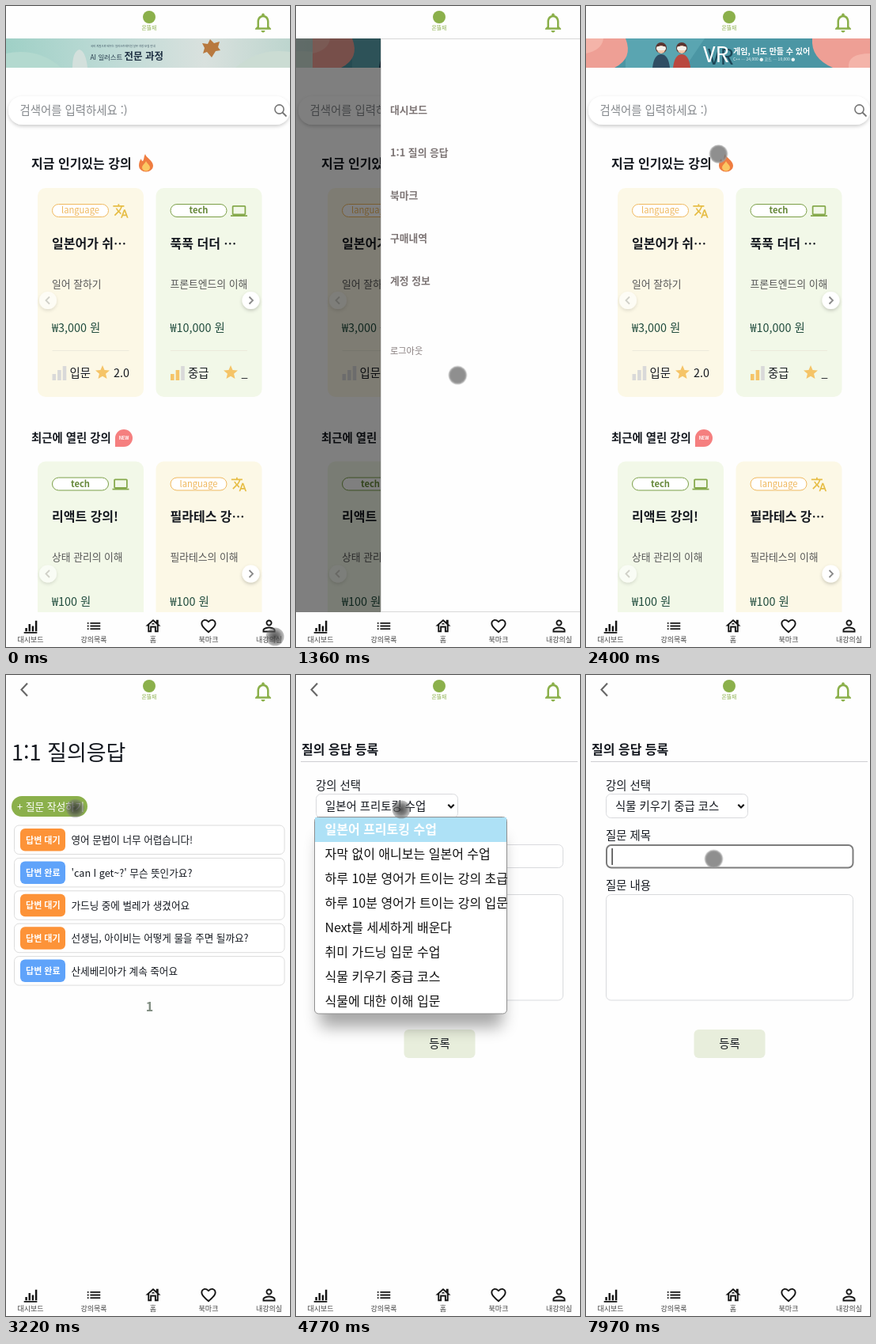
These frames come from a looping animation (359 px wide and 810 px high, 8000 ms). An HTML page:

```html
<!DOCTYPE html>
<html lang="ko">
<head>
<meta charset="utf-8">
<title>강의 앱</title>
<style>
  html, body { margin: 0; width: 100%; height: 100%; overflow: hidden; background: #fefefe; }
  svg { display: block; }
  text { font-family: "Noto Sans CJK KR", "Noto Sans", sans-serif; }
</style>
</head>
<body>
<svg id="stage" width="359" height="810" viewBox="0 0 359 810">
  <defs>
    <linearGradient id="sky">
      <stop offset="0" stop-color="#9fd0c6"/><stop offset=".35" stop-color="#bcdad5"/>
      <stop offset=".7" stop-color="#d9e1de"/><stop offset="1" stop-color="#bdd5ce"/>
    </linearGradient>
    <radialGradient id="press">
      <stop offset="0" stop-color="#333" stop-opacity=".85"/>
      <stop offset=".55" stop-color="#505050" stop-opacity=".72"/>
      <stop offset="1" stop-color="#777" stop-opacity=".45"/>
    </radialGradient>
    <filter id="soft" x="-20%" y="-50%" width="140%" height="220%">
      <feDropShadow dx="0" dy="2" stdDeviation="2" flood-opacity=".2"/>
    </filter>
    <filter id="blur" x="-20%" y="-20%" width="140%" height="140%"><feGaussianBlur stdDeviation="10"/></filter>
    <clipPath id="strip"><rect y="41" width="359" height="37"/></clipPath>
  </defs>
</svg>
<script>
const LOOP = 8000;
const GREEN = '#8bb04b', INK = '#14181f';
const stage = document.getElementById('stage');

const icons = {
  translate: 'M12.87 15.07l-2.54-2.51.03-.03c1.74-1.94 2.98-4.17 3.71-6.53H17V4h-7V2H8v2H1v1.99h11.17C11.5 7.92 10.44 9.75 9 11.35 8.07 10.32 7.3 9.19 6.69 8h-2c.73 1.63 1.73 3.17 2.98 4.56l-5.09 5.02L4 19l5-5 3.11 3.11.76-2.04zM18.5 10h-2L12 22h2l1.12-3h4.75L21 22h2l-4.5-12zm-2.62 7l1.62-4.33L19.12 17h-3.24z',
  laptop: 'M20 18c1.1 0 2-.9 2-2V6c0-1.1-.9-2-2-2H4c-1.1 0-2 .9-2 2v10c0 1.1.9 2 2 2H0v2h24v-2h-4zM4 6h16v10H4V6z',
  star: 'M12 17.27L18.18 21l-1.64-7.03L22 9.24l-7.19-.61L12 2 9.19 8.63 2 9.24l5.46 4.73L5.82 21z',
  bell: 'M12 22c1.1 0 2-.9 2-2h-4c0 1.1.9 2 2 2zm6-6v-5c0-3.07-1.63-5.64-4.5-6.32V4c0-.83-.67-1.5-1.5-1.5s-1.5.67-1.5 1.5v.68C7.64 5.36 6 7.92 6 11v5l-2 2v1h16v-1l-2-2zm-2 1H8v-6c0-2.48 1.51-4.5 4-4.5s4 2.02 4 4.5v6z',
  chart: 'M2 21h20v2H2zM4 15h3v5H4zM9 9h3v11H9zM14 12h3v8h-3zM19 4h3v16h-3z',
  list: 'M3 13h2v-2H3v2zm0 4h2v-2H3v2zm0-8h2V7H3v2zm4 4h14v-2H7v2zm0 4h14v-2H7v2zM7 7v2h14V7H7z',
  house: 'M19 9.3V4h-3v2.6L12 3 2 12h3v8h5v-6h4v6h5v-8h3l-3-2.7zM17 18h-1v-6H8v6H7v-7.81l5-4.5 5 4.5V18zM10 10c0-1.1.9-2 2-2s2 .9 2 2h-4z',
  heart: 'M16.5 3c-1.74 0-3.41.81-4.5 2.09C10.91 3.81 9.24 3 7.5 3 4.42 3 2 5.42 2 8.5c0 3.78 3.4 6.86 8.55 11.54L12 21.35l1.45-1.32C18.6 15.36 22 12.28 22 8.5 22 5.42 19.58 3 16.5 3zm-4.4 15.55l-.1.1-.1-.1C7.14 14.24 4 11.39 4 8.5 4 6.5 5.5 5 7.5 5c1.54 0 3.04.99 3.57 2.36h1.87C13.46 5.99 14.96 5 16.5 5c2 0 3.5 1.5 3.5 3.5 0 2.89-3.14 5.74-7.9 10.05z',
  person: 'M12 5.9c1.16 0 2.1.94 2.1 2.1s-.94 2.1-2.1 2.1S9.9 9.16 9.9 8s.94-2.1 2.1-2.1m0 9c2.97 0 6.1 1.46 6.1 2.1v1.1H5.9V17c0-.64 3.13-2.1 6.1-2.1M12 4C9.79 4 8 5.79 8 8s1.79 4 4 4 4-1.79 4-4-1.79-4-4-4zm0 9c-2.67 0-8 1.34-8 4v3h16v-3c0-2.66-5.33-4-8-4z'
};

// Drawing helpers; text and icons are placed by their vertical centre.
const text = (x, y, size, str, fill = INK, weight = 400, anchor = 'start') =>
  `<text x="${x}" y="${y + size * .37}" font-size="${size}" fill="${fill}" font-weight="${weight}" text-anchor="${anchor}">${str}</text>`;
const rect = (x, y, w, h, r, fill, more = '') =>
  `<rect x="${x}" y="${y}" width="${w}" height="${h}" rx="${r}" fill="${fill}" ${more}/>`;
const path = (d, fill, more = '') => `<path d="${d}" fill="${fill}" ${more}/>`;
const line = (d, color, width) => path(d, 'none', `stroke="${color}" stroke-width="${width}"`);
const circle = (x, y, r, fill, more = '') => `<circle cx="${x}" cy="${y}" r="${r}" fill="${fill}" ${more}/>`;
const icon = (name, x, y, size, fill) =>
  path(icons[name], fill, `transform="translate(${x - size / 2} ${y - size / 2}) scale(${size / 24})"`);
const group = (id, body, more = '') => `<g id="${id}" ${more}>${body}</g>`;

const kinds = {
  language: { bg: '#fcf8e6', edge: '#f0b95f', ink: '#efb75c', icon: 'translate', tint: '#e6bd45', weight: 500 },
  tech: { bg: '#f2f8e8', edge: '#7b9f47', ink: '#66883a', icon: 'laptop', tint: '#86a94c', weight: 700 }
};

function card(x, y, kind, title, sub, price, level, bars, score) {
  const k = kinds[kind], l = x + 18.5;
  return rect(x, y, 134, 264, 10, k.bg) +
    rect(l, y + 20.5, 71, 16, 8, '#fff', `stroke="${k.edge}"`) +
    text(l + 35.5, y + 28, 11.2, kind, k.ink, k.weight, 'middle') +
    icon(k.icon, x + 105, y + 29, 21, k.tint) +
    text(l - .5, y + 70, 16, title, INK, 600) +
    text(l - .5, y + 121, 12.8, sub, '#555') +
    text(l - .5, y + 177, 14.4, `₩${price} 원`, '#1f4b3c', 500) +
    line(`M${l} ${y + 205.5}h97`, '#eceadb', 1) +
    [8, 13, 18].map((h, i) => rect(l + i * 6.6, y + 243 - h, 4.6, h, 0, i < bars ? '#f5c468' : '#d9d9d9')).join('') +
    text(x + 40.5, y + 234, 14.4, level) +
    icon('star', x + (score === '_' ? 94.5 : 82), y + 233, 21.5, '#f5c468') +
    text(x + 116, y + 234, 14.4, score, INK, 400, 'end').replace('text-anchor="end"', score === '_' ? 'text-anchor="end"' : 'text-anchor="end"');
}

function arrows(y) {
  return circle(53, y, 11, '#fff', 'opacity=".6" filter="url(#soft)"') + line(`M55 ${y - 4.5}l-4.5 4.5 4.5 4.5`, '#d0d0c8', 1.8) +
    circle(309.5, y, 11, '#fff', 'filter="url(#soft)"') + line(`M307.5 ${y - 4.5}l4.5 4.5-4.5 4.5`, '#8a8a8a', 1.8);
}

const artBanner = rect(0, 41, 359, 37, 0, 'url(#sky)') +
  path('M0 78V60Q40 52 70 78z', '#b3d9cf') + path('M84 78Q84 57 93 55Q101 58 103 78z', '#d3e0dc') +
  path('M260 65L254 58 249 60 251 53 248 47 255 48 258 42 263 47 270 45 268 52 271 56 265 57z', '#b8793f') +
  path('M290 78Q320 52 359 58V78z', '#cbdcd3') +
  text(107, 51, 3.4, '국비 지원으로 배우는 일러스트레이션 실무 과정 모집 안내', '#3b5160') +
  text(106.5, 64.5, 8.4, 'AI 일러스트', '#24384a', 500) + text(149.5, 63.5, 12.5, '전문 과정', '#1d2f42', 700);

const player = (x, coat) => circle(x, 53, 7, '#5a3430') + circle(x, 55, 5, '#f1c9ae') +
  rect(x - 6, 51, 12, 5, 2, '#f4f1ea') + path(`M${x - 11} 78Q${x - 9} 61 ${x} 61T${x + 11} 78z`, coat);
const gameBanner = group('game', rect(0, 41, 359, 37, 0, '#4b96a4') +
  path('M50 78V41H150L125 78z', '#5aa5b1') +
  path('M0 41H50Q60 66 36 78H0z', '#ee9f95') + path('M359 41H286Q284 66 312 78H359z', '#ee9f95') +
  path('M0 41H22Q20 56 0 60z', '#f4b4a9') + path('M359 60Q330 60 332 78H359z', '#f4b4a9') +
  player(95, '#2f4d63') + player(121, '#b9483f') +
  text(154, 64, 27, 'VR', '#1c4656', 500) + text(148, 61, 27, 'VR', '#fff', 400) +
  text(186, 57, 10, '게임, 너도 만들 수 있어', '#fff', 700) +
  text(186, 67.5, 5, 'C++ ─ 24,000 ● 코드 ─ 10,000 ●', '#e8f3f3'), 'transform="translate(359 0)"');

const home = group('home',
  group('strip-box', group('banners', artBanner + gameBanner), 'clip-path="url(#strip)"') +
  rect(3, 114, 356, 36, 18, '#fff', 'filter="url(#soft)"') +
  text(17.5, 131.5, 14.4, '검색어를 입력하세요 :)', '#84888c', 500) +
  circle(345.5, 130.5, 5.6, 'none', 'stroke="#777" stroke-width="1.6"') + line('M349.5 134.5l5 5', '#777', 1.8) +
  text(32, 199, 16, '지금 인기있는 강의', INK, 600) +
  path('M176 187c1 5 10 8 10 15a9 7.5 0 0 1-18 0c0-4 1-7 3-9 0 2 1 3 2 3 2-3 1-6 3-9z', '#ef7d40') +
  path('M177 196c1 3 5 5 5 8a5 4.5 0 0 1-10 0c0-3 4-5 5-8z', '#fbc763') +
  card(40, 230, 'language', '일본어가 쉬…', '일어 잘하기', '3,000', '입문', 0, '2.0') +
  card(189.5, 230, 'tech', '푹푹 더더 …', '프론트엔드의 이해', '10,000', '중급', 2, '_') +
  arrows(372) +
  text(32, 546, 14.4, '최근에 열린 강의', INK, 600) +
  path('M138 557V546a11 11 0 1 1 11 11z', '#f57f7f') + text(149, 546, 5.6, 'NEW', '#fff', 700, 'middle') +
  card(40, 575.5, 'tech', '리액트 강의!', '상태 관리의 이해', '100', '중급', 2, '_') +
  card(189.5, 575.5, 'language', '필라테스 강…', '필라테스의 이해', '100', '입문', 0, '_') +
  arrows(717.5));

const menu = ['대시보드', '1:1 질의 응답', '북마크', '구매내역', '계정 정보'];
const drawer = group('shade', rect(0, 41, 359, 725, 0, '#000', 'opacity=".5"')) +
  group('drawer', rect(107.5, 41.5, 260, 724, 0, '#fefefe', 'stroke="#d8d8d8"') +
    menu.map((m, i) => text(119, 131.5 + 54 * i, 12.8, m, '#7d7575', 700)).join('') +
    text(119, 436, 11.2, '로그아웃', '#857b7b', 500));

const questions = [
  [0, '영어 문법이 너무 어렵습니다!'], [1, "'can I get~?' 무슨 뜻인가요?"], [0, '가드닝 중에 벌레가 생겼어요'],
  [0, '선생님, 아이비는 어떻게 물을 주면 될까요?'], [1, '산세베리아가 계속 죽어요']
];
const board = group('board',
  text(7, 98, 27, '1:1 질의응답', INK, 500) +
  rect(7, 153, 96, 26, 13, GREEN) + text(14, 166.5, 12.8, '+ 질문 작성하기', '#fff', 500) +
  group('rows', questions.map(([done, q], i) => {
    const y = 190 + 41.4 * i;
    return rect(10.5, y, 341.5, 36.5, 6, '#fff', 'stroke="#dcdcdc"') +
      rect(18, y + 4, 57, 28.5, 6, done ? '#5fa3fa' : '#fd9338') +
      text(46.8, y + 18.5, 11, done ? '답변 완료' : '답변 대기', '#fff', 700, 'middle') +
      text(82.5, y + 18.5, 12.6, q, INK, 500);
  }).join('') + text(181.5, 419, 16, '1', '#7f8c80', 700, 'middle')));

const courses = ['일본어 프리토킹 수업', '자막 없이 애니보는 일본어 수업', '하루 10분 영어가 트이는 강의 초급',
  '하루 10분 영어가 트이는 강의 입문', 'Next를 세세하게 배운다', '취미 가드닝 입문 수업', '식물 키우기 중급 코스', '식물에 대한 이해 입문'];
const field = (y, w, h) => rect(25.5, y, w, h, 6, '#fff', 'stroke="#d9dadd"');
const form = group('form',
  text(7, 94, 16, '질의 응답 등록', INK, 600) + line('M6 109.5H356', '#cfcfd2', 1) +
  text(25, 139.5, 14.4, '강의 선택', INK, 500) + field(150.5, 179, 30) +
  text(37, 166, 14.4, courses[0]).replace('<text', '<text id="before"') +
  text(37, 166, 14.4, courses[6]).replace('<text', '<text id="after"') +
  line('M192.3 163.8l3.7 3.7 3.7-3.7', '#111', 2.1) +
  text(25, 202.5, 14.4, '질문 제목', INK, 500) + field(214.5, 312, 29) +
  group('focus', rect(26, 215, 311.5, 28.5, 6, '#fff', 'stroke="#7d7d7d" stroke-width="2"')) +
  group('caret', rect(32.5, 219, 1.2, 21, 0, '#111')) +
  text(25, 265.5, 14.4, '질문 내용', INK, 500) + field(277.5, 312, 133.5) +
  rect(136.5, 448, 90, 36, 6, '#e8eedc') + text(181.5, 466, 14.4, '등록', INK, 400, 'middle'));

const row = i => 195 + 31 * i;
const picked = i => rect(24, row(i) - 15, 242, 31, 0, '#aee1f6') + text(36.5, row(i), 16, courses[i], '#fff', 700);
const popup = group('popup',
  rect(30, 205, 231, 240, 6, '#000', 'opacity=".34" filter="url(#blur)"') +
  rect(23.5, 179.5, 243, 248.5, 5, '#fff', 'stroke="#8f8f8f"') +
  courses.map((c, i) => text(36.5, row(i), 16, c, '#111')).join('') +
  group('first', picked(0)) + group('seventh', picked(6)));

const tabs = [['chart', 31, 20, '대시보드'], ['list', 111, 22, '강의목록'], ['house', 186, 23, '홈'],
  ['heart', 256, 23, '북마크'], ['person', 332.5, 24, '내강의실']];
const chrome = rect(0, 0, 359, 41, 0, '#fefefe') +
  circle(181, 14, 8, GREEN) + text(181, 27.5, 6.8, '온뜰재', GREEN, 500, 'middle') +
  icon('bell', 325, 21, 30, GREEN) +
  group('back', line('M27 10.5l-7.5 8 7.5 8', '#666', 2.1)) +
  rect(0, 766, 359, 44, 0, '#fefefe') +
  tabs.map(([n, x, s, label]) => icon(n, x, 783.5, s, '#151515') + text(x, 801, 9, label, '#444', 400, 'middle')).join('');

const cursor = group('cursor',
  group('idle', circle(0, 0, 10.5, '#707070', 'fill-opacity=".78" stroke="#a0a0a0" stroke-opacity=".75" stroke-width="2"')) +
  group('down', circle(0, 0, 11.5, 'url(#press)')) +
  group('arrow', path('M0 0V17l4-3.8 2.8 6.4 2.7-1.2-2.8-6.2H12z', '#fff', 'stroke="#222"')));

stage.insertAdjacentHTML('beforeend', home + board + form + drawer + chrome + popup + cursor);

// Steps are [ms, value, easing to the next step]; without easing the value holds.
const start = document.timeline.currentTime || 0;
function run(id, prop, steps) {
  const last = steps[steps.length - 1];
  const frames = [...steps, [LOOP, last[1]]].map(([ms, v, easing = 'steps(1, end)']) =>
    ({ offset: ms / LOOP, [prop]: v, easing }));
  document.getElementById(id).animate(frames, { duration: LOOP, iterations: Infinity }).startTime = start;
}
// Visible inside each [from, to) span.
function show(id, ...spans) {
  const steps = spans.flatMap(([from, to]) => to < LOOP ? [[from, 1], [to, 0]] : [[from, 1]]);
  if (steps[0][0] > 0) steps.unshift([0, 0]);
  run(id, 'opacity', steps);
}
const at = (x, y) => `translate(${x}px, ${y}px)`;

show('home', [0, 2530]);
show('board', [2530, 3500]);
show('rows', [2600, LOOP]);
show('form', [3500, LOOP]);
show('back', [2530, LOOP]);
show('before', [0, 6160]);
show('after', [6160, LOOP]);
show('first', [0, 5610]);
show('seventh', [5610, LOOP]);
show('focus', [6840, LOOP]);
show('caret', [6910, 7440], [7970, LOOP]);
show('down', [0, 1010], [1900, 2130], [3150, 3560], [4230, 4840], [6770, 6900]);
show('idle', [1010, 1900], [2130, 3150], [3560, 4230], [6160, 6770], [6900, LOOP]);
show('arrow', [4840, 6160]);

run('banners', 'transform', [[0, at(0, 0)], [1010, at(0, 0), 'ease'], [1510, at(-359, 0)]]);
run('shade', 'opacity', [[0, 0], [670, 1], [1900, 1, 'ease-in-out'], [2330, 0]]);
run('drawer', 'transform', [[0, at(260, 0)], [670, at(0, 0)], [1900, at(0, 0), 'ease-in-out'], [2330, at(260, 0)]]);
run('popup', 'opacity', [[0, 0], [4360, 0, 'linear'], [4570, 1], [6160, 0]]);
run('cursor', 'transform', [
  [0, at(340, 797)],
  [1010, at(340, 797), 'cubic-bezier(.4, .2, .8, .8)'],
  [1360, at(204.5, 467.5), 'cubic-bezier(.3, .5, .6, 1)'],
  [1850, at(167.5, 187)],
  [2870, at(167.5, 187), 'ease-in-out'],
  [3150, at(87.5, 168.5)],
  [3950, at(87.5, 168.5), 'ease-in-out'],
  [4230, at(133, 170)],
  [4840, at(133, 170), 'ease-in-out'],
  [5540, at(148, 387)],
  [5610, at(148, 387), 'ease-out'],
  [6020, at(154.5, 387)],
  [6300, at(154.5, 387), 'ease-in-out'],
  [6770, at(161.5, 232.5)]
]);
</script>
</body>
</html>
```
